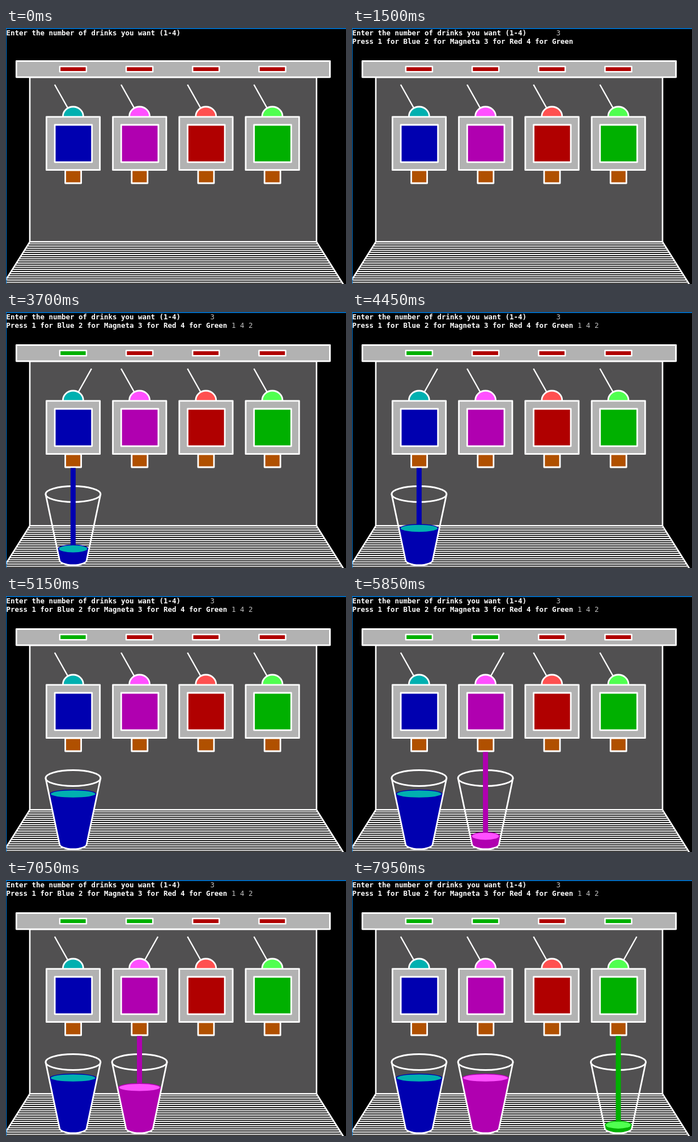
Write an HTML page that moves like this. It is 600 by 452 pixels and loops after 8 s.

```html
<!DOCTYPE html>
<html lang="en">
<head>
<meta charset="utf-8">
<title>Drinks machine</title>
<style>
  html, body { margin: 0; width: 100%; height: 100%; overflow: hidden; background: #000; }
  svg { display: block; width: 100vw; height: 100vh; }
  text { font: bold 12.46px "DejaVu Sans Mono", "Liberation Mono", monospace; fill: #fff; white-space: pre; }
  .echo { font-weight: normal; fill: #c0c0c0; }
</style>
</head>
<body>
<svg id="stage" viewBox="0 0 600 452"></svg>
<script>
const LOOP = 8000, TICK = 50;
const GRAY = '#b2b2b2', WALL = '#515051', BROWN = '#b05000', RED = '#b00000', GREEN = '#00b000';

// pour: the time at which the tap opens
const machines = [
  { dark: '#0000b0', light: '#00b0b0', pour: 3290 },
  { dark: '#b000b0', light: '#ff50ff', pour: 5565 },
  { dark: RED, light: '#ff5050' },
  { dark: GREEN, light: '#50ff50', pour: 7840 }
];
const PITCH = 117.2, FIRST_X = 118.4;
const GLASS_LEAD = 220, SPEED = 0.0483;
const RIM_Y = 321.5, BASE_Y = 438, FULL_Y = 349.5, RIM_R = 48.5, BASE_R = 24;
const typed = [[1750, '1'], [2050, '1 4'], [2350, '1 4 2']];

const stage = document.getElementById('stage');

function add(parent, tag, attrs, content) {
  const node = document.createElementNS('http://www.w3.org/2000/svg', tag);
  for (const key in attrs) node.setAttribute(key, attrs[key]);
  if (content) node.textContent = content;
  parent.appendChild(node);
  return node;
}

function box(parent, left, top, right, bottom, fill, line = 2.8) {
  return add(parent, 'rect', {
    x: left, y: top, width: right - left, height: bottom - top,
    fill, stroke: '#fff', 'stroke-width': line, 'stroke-linejoin': 'round'
  });
}

function stroke(parent, d, width = 2.8, fill = 'none') {
  return add(parent, 'path', { d, fill, stroke: '#fff', 'stroke-width': width });
}

function show(node, visible) {
  node.setAttribute('visibility', visible ? 'visible' : 'hidden');
}

function drawRoom() {
  const slope = 0.63, floorY = 377.5;
  let lines = '';
  for (let y = 381.2; y < 453; y += 3.75) {
    const spread = (y - floorY) * slope;
    lines += `M${42 - spread} ${y}H${548 + spread}`;
  }
  stroke(stage, lines, 1.9);
  const spread = (456 - floorY) * slope;
  stroke(stage, `M${42 - spread} 456L42 ${floorY}H548L${548 + spread} 456`, 2.6);
  box(stage, 42, 87, 548, floorY, WALL, 2.6);
  box(stage, 18.3, 58.3, 571.7, 86.8, GRAY);
}

function drawMachine(machine, index) {
  const g = add(stage, 'g', { transform: `translate(${FIRST_X + index * PITCH} 0)` });
  machine.lamp = box(g, -23.5, 68, 23.5, 77.3, RED, 2.5);
  machine.lever = stroke(g, 'M-9.5 141L-32.5 100', 2.4);
  stroke(g, 'M-18 156A18 17 0 0 1 18 156', 2.8, machine.light);
  box(g, -47, 156.8, 47.3, 250.7, GRAY);
  box(g, -32.3, 171, 33.3, 236.8, machine.dark);
  box(g, -13.8, 251, 14.2, 274, BROWN);
  if (!machine.pour) return;

  machine.drink = add(g, 'g', {});
  machine.body = add(machine.drink, 'path', { fill: machine.dark });
  machine.back = add(machine.drink, 'ellipse', { ry: 7.8, fill: machine.dark });
  machine.surface = add(machine.drink, 'ellipse', { ry: 6.2, fill: machine.light });
  machine.glass = add(g, 'g', {});
  add(machine.glass, 'ellipse', {
    cy: RIM_Y, rx: RIM_R, ry: 14, fill: 'none', stroke: '#fff', 'stroke-width': 2.8
  });
  stroke(machine.glass,
    `M${-RIM_R} ${RIM_Y}L${-BASE_R} ${BASE_Y}A${BASE_R} 9 0 0 0 ${BASE_R} ${BASE_Y}L${RIM_R} ${RIM_Y}`);
  machine.stream = add(g, 'rect', { x: -4.5, y: 275.4, width: 9, fill: machine.dark });
}

function pose(machine, t) {
  if (!machine.pour) return;
  const elapsed = t - machine.pour;
  const started = elapsed >= 0;
  const y = Math.max(FULL_Y, BASE_Y - SPEED * Math.max(0, elapsed));
  const pouring = started && y > FULL_Y;
  const half = RIM_R + (BASE_R - RIM_R) * (y - RIM_Y) / (BASE_Y - RIM_Y);
  show(machine.glass, elapsed >= -GLASS_LEAD);
  show(machine.drink, started);
  show(machine.stream, pouring);
  machine.lamp.setAttribute('fill', started ? GREEN : RED);
  machine.lever.setAttribute('transform', pouring ? 'scale(-1 1)' : '');
  machine.body.setAttribute('d',
    `M${-half} ${y}L${-BASE_R} ${BASE_Y}A${BASE_R} 9 0 0 0 ${BASE_R} ${BASE_Y}L${half} ${y}Z`);
  for (const [node, inset] of [[machine.back, 1], [machine.surface, 3.2]]) {
    node.setAttribute('cy', y);
    node.setAttribute('rx', half - inset);
  }
  machine.stream.setAttribute('height', y - 6.5 - 275.4);
}

drawRoom();
machines.forEach(drawMachine);
add(stage, 'rect', { width: 600, height: 1.7, fill: '#0078d7' });
add(stage, 'rect', { width: 1, height: 452, fill: '#0078d7' });
add(stage, 'text', { x: 0.5, y: 12.7 }, 'Enter the number of drinks you want (1-4)');
const count = add(stage, 'text', { x: 360.5, y: 12.7, class: 'echo' }, '3');
const prompt = add(stage, 'text', { x: 0.5, y: 27.7 },
  'Press 1 for Blue 2 for Magneta 3 for Red 4 for Green');
const choices = add(stage, 'text', { x: 398, y: 27.7, class: 'echo' });

function render(t) {
  show(count, t >= 650);
  show(prompt, t >= 1050);
  const keys = typed.filter(([time]) => t >= time).pop();
  choices.textContent = keys ? keys[1] : '';
  machines.forEach(machine => pose(machine, t));
}

const start = performance.now();
function frame() {
  const t = (performance.now() - start) % LOOP;
  render(Math.floor(t / TICK) * TICK);
  requestAnimationFrame(frame);
}
render(0);
requestAnimationFrame(frame);
</script>
</body>
</html>
```
